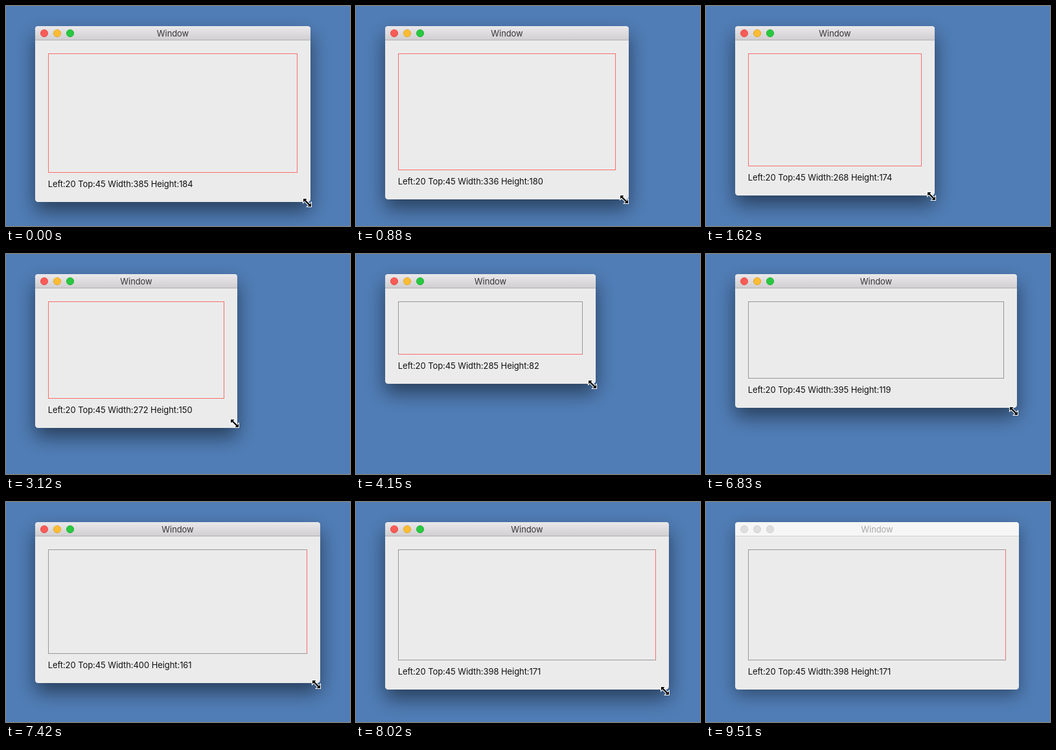
An HTML page with a canvas that plays this animation: 531x339 px, repeating every 9610 ms.

```html
<!DOCTYPE html>
<html lang="en">
<head>
<meta charset="utf-8">
<title>Window resize</title>
<style>
  html, body { margin: 0; width: 100%; height: 100%; overflow: hidden; background: #507db6; }
  canvas { display: block; }
</style>
</head>
<body>
<canvas id="stage" width="531" height="339"></canvas>
<script>
const ctx = document.getElementById('stage').getContext('2d');
const LOOP = 9610, STEP = 147;
const LEFT = 45, TOP = 31, BAR = 22;
const FONT = '13px Inter, "Open Sans", sans-serif';

const ease = {
  both: k => k * k * (3 - 2 * k),
  in: k => Math.pow(k, 1.4),
  out: k => 1 - (1 - k) * (1 - k),
  linear: k => k
};

// start, steps, final width, final height, easing
const drags = [
  [440, 9, 268, 174, 'both'],
  [2970, 6, 285, 82, 'both'],
  [4750, 4, 374, 98, 'in'],
  [5340, 4, 395, 114, 'out'],
  [6830, 1, 395, 119, 'linear'],
  [6978, 4, 400, 161, 'linear'],
  [7570, 4, 398, 171, 'out']
];

// line colours of the box: top, right, bottom, left
const edges = [
  [0, 'rrrr'], [3563, 'ggrg'], [4750, 'rrrr'], [6830, 'gggg'], [6978, 'grgg']
];
const lineColors = { r: '#fb6c6c', g: '#989898' };

const poses = buildPoses();

function buildPoses() {
  const list = [{ t: 0, w: 385, h: 184 }];
  for (const [start, steps, w, h, kind] of drags) {
    const from = list[list.length - 1];
    for (let i = 1; i <= steps; i++) {
      const k = ease[kind](i / steps);
      list.push({
        t: start + (i - 1) * STEP,
        w: Math.round(from.w + (w - from.w) * k),
        h: Math.round(from.h + (h - from.h) * k)
      });
    }
  }
  return list;
}

function poseAt(t) {
  let i = 0;
  while (i + 1 < poses.length && poses[i + 1].t <= t) i++;
  const pose = poses[i], next = poses[i + 1];
  const moving = next && pose.t > 0 && next.t - pose.t < 200;
  // the pointer runs slightly ahead of the window while dragging
  const leadX = moving ? (next.w - pose.w) * 0.12 : 0;
  const leadY = moving ? (next.h - pose.h) * 0.35 : 0;
  return { w: pose.w, h: pose.h, leadX, leadY };
}

function polygon(x, y, points) {
  ctx.beginPath();
  points.forEach(([px, py], i) => i ? ctx.lineTo(x + px, y + py) : ctx.moveTo(x + px, y + py));
  ctx.closePath();
  ctx.lineJoin = 'miter';
  ctx.lineWidth = 2;
  ctx.strokeStyle = '#fff';
  ctx.stroke();
  ctx.fillStyle = '#000';
  ctx.fill();
}

function drawResizeCursor(x, y) {
  const half = [[-6, -6], [-0.5, -6], [-2.4, -4.1], [4.1, 2.4], [6, 0.5]];
  polygon(x, y, half.concat(half.map(([px, py]) => [-px, -py])));
}

function drawArrowCursor(x, y) {
  polygon(x, y, [[0, 0], [0, 13], [3, 10.3], [5.2, 15.5], [7.4, 14.6], [5.2, 9.5], [9.3, 9.3]]);
}

function drawFrame(w, h, active) {
  ctx.save();
  ctx.shadowColor = active ? 'rgba(0,0,0,.5)' : 'rgba(0,0,0,.38)';
  ctx.shadowBlur = active ? 30 : 26;
  ctx.shadowOffsetY = active ? 14 : 9;
  ctx.fillStyle = '#ebebeb';
  ctx.beginPath();
  ctx.roundRect(LEFT, TOP, w, h, 4.5);
  ctx.fill();
  ctx.restore();

  const shade = ctx.createLinearGradient(0, TOP, 0, TOP + BAR);
  shade.addColorStop(0, active ? '#eae8ea' : '#f6f6f6');
  shade.addColorStop(1, active ? '#d0ced0' : '#f6f6f6');
  ctx.fillStyle = shade;
  ctx.beginPath();
  ctx.roundRect(LEFT, TOP, w, BAR, [4.5, 4.5, 0, 0]);
  ctx.fill();
  ctx.fillStyle = active ? '#b3b1b3' : '#d2d2d2';
  ctx.fillRect(LEFT, TOP + BAR - 1, w, 1);
}

function drawLights(active) {
  const lights = active
    ? [['#fc5b57', '#e2463f'], ['#fdbc34', '#dfa023'], ['#28c840', '#1dab2d']]
    : Array(3).fill(['#dddddd', '#cccccc']);
  lights.forEach(([fill, rim], i) => {
    ctx.beginPath();
    ctx.arc(LEFT + 14 + i * 20, TOP + 11, 5.6, 0, Math.PI * 2);
    ctx.fillStyle = fill;
    ctx.fill();
    ctx.lineWidth = 0.8;
    ctx.strokeStyle = rim;
    ctx.stroke();
  });
}

function drawBox(w, h, t) {
  const x = LEFT + 20, y = TOP + 42;
  const colors = edges.filter(e => e[0] <= t).pop()[1];
  const sides = [[x, y, w, 1], [x + w - 1, y, 1, h], [x, y + h - 1, w, 1], [x, y, 1, h]];
  sides.forEach((side, i) => {
    ctx.fillStyle = lineColors[colors[i]];
    ctx.fillRect(...side);
  });
}

function label(text, x, y, color, align) {
  ctx.font = FONT;
  ctx.letterSpacing = '-0.08px';
  ctx.textAlign = align;
  ctx.fillStyle = color;
  ctx.fillText(text, x, y);
}

function draw(t) {
  const { w, h, leadX, leadY } = poseAt(t);
  const winW = w + 40, winH = h + 87;
  const active = t < 9510;

  ctx.fillStyle = '#507db6';
  ctx.fillRect(0, 0, 531, 339);
  drawFrame(winW, winH, active);
  drawLights(active);
  label('Window', LEFT + winW / 2, TOP + 16, active ? '#363636' : '#a8a8a8', 'center');
  drawBox(w, h, t);
  label(`Left:20 Top:45 Width:${w} Height:${h}`, LEFT + 19.7, TOP + h + 64, '#111', 'left');

  const x = LEFT + winW, y = TOP + winH;
  if (t >= 4000 && t < 4150) {
    drawArrowCursor(x - 6, y);
  } else if (t < 9070) {
    const gripX = t < 7000 ? -5 : -6, gripY = t < 7565 ? 1 : 2;
    drawResizeCursor(x + Math.round(gripX + leadX), y + Math.round(gripY + leadY));
  }
}

const begin = performance.now();
function tick() {
  draw((performance.now() - begin) % LOOP);
  requestAnimationFrame(tick);
}
tick();
</script>
</body>
</html>
```
